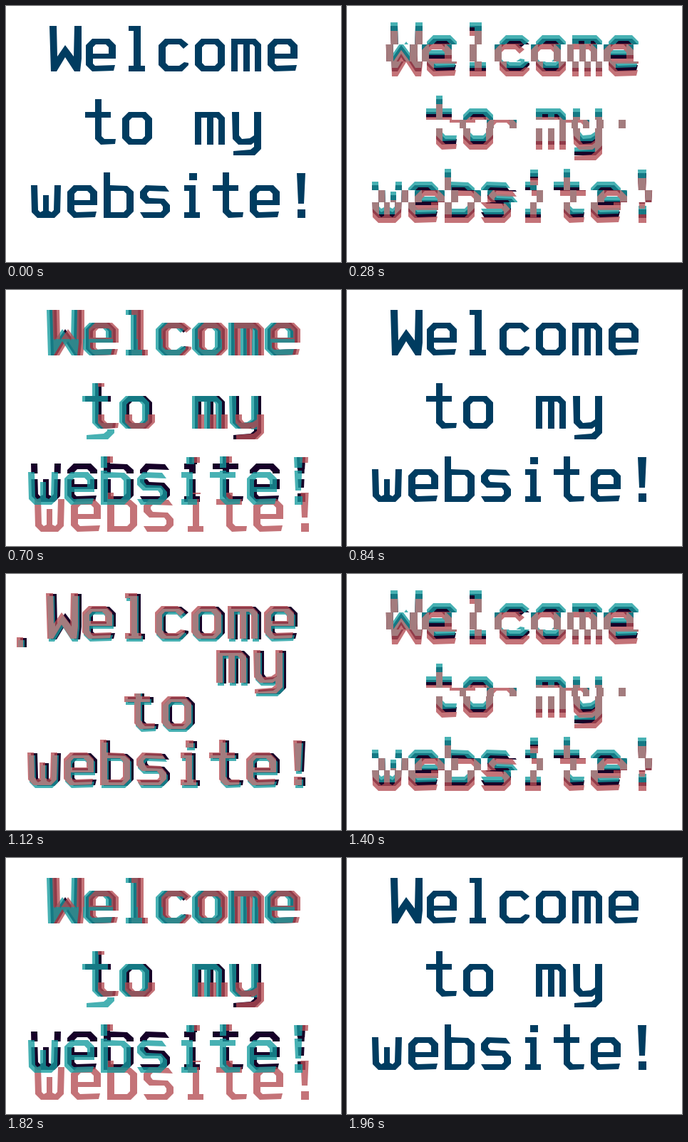
Write an HTML page with a canvas that moves like this. It is 470 px wide and 360 px high and loops after 2.1 s.

```html
<!DOCTYPE html>
<html lang="en">
<head>
<meta charset="utf-8">
<title>Welcome to my website!</title>
<style>
html, body { margin: 0; width: 100%; height: 100%; overflow: hidden; background: #fff; }
canvas { display: block; }
</style>
</head>
<body>
<canvas id="stage" width="470" height="360"></canvas>
<script>
const ctx = document.getElementById('stage').getContext('2d');
const PITCH = 51.1, STEP = 140;
const NAVY = '#003c60', DARK = '#160028', GREY = '#a37c7e';
const CYAN = 'rgba(20,155,158,.78)', RED = 'rgba(180,76,83,.78)';

// Glyph outlines, centred on x = 0 with the baseline at y = 0.
const glyphs = {
  W: 'M-21-64h10l1 43 11-16 12 16 1-43h10v46l-2 18h-8l-13-20-12 20h-8z',
  e: 'M-21-37l9-9h24l9 9v19h-32v7l3 3 28-1-2 8-30 1-9-9zM-11-25h22v-9l-4-4h-14l-4 4z',
  l: 'M-12-64h17v56h6v8h-23v-8h7v-49h-7z',
  c: 'M-21-37l9-9h23l10 8-7 6-6-6h-15l-4 4v22l4 4h15l7-5 6 1v3l-9 9h-24l-9-9z',
  o: 'M-21-37l9-9h24l9 9v28l-9 9h-24l-9-9zM-11-34v22l4 4h14l4-4v-22l-4-4h-14z',
  m: 'M-21-46h34l8 8v38h-9v-35l-3-3h-4v38h-9v-38h-8v38h-9z',
  t: 'M-8-64h9v18h13v8h-13v26l4 4h16l-1 7-20 1-8-8v-30h-14v-8h14z',
  y: 'M-20-46h10v33l4 5 11-1 6-4v-33h10v52l-9 9h-30v-6l24-2 5-4v-6l-4 3h-18l-8-8z',
  w: 'M-21-46h9l1 35 3 3 4-2v-22h8v22l4 2 3-3 1-35h9l-1 38-8 8h-24l-8-8z',
  b: 'M-21-64h9v18l24 1 9 8v28l-9 9h-33zM-11-38v30h18l4-4v-22l-4-4z',
  s: 'M-21-37l8-9 27 1 6 8-28-1-3 3v3l3 4 21 1 8 9v9l-9 9h-28l-5-8h29l3-3v-5l-3-4h-21l-8-8z',
  i: 'M-4-63h11v10h-11zM-11-46h16v38h6v8h-22v-8h7v-30h-7z',
  '!': 'M-6-63h12l-2 43h-8zM-5-12h11v12h-11z'
};

const text = new Path2D();
['Welcome', 'to my', 'website!'].forEach((line, row) => {
  [...line].forEach((ch, i) => {
    if (!glyphs[ch]) return;
    const x = Math.round(235 + (i - (line.length - 1) / 2) * PITCH);
    text.addPath(new Path2D(glyphs[ch]), new DOMMatrix().translate(x, 92 + 103 * row));
  });
});

const layer = (color, x = 0, y = 0) => () => {
  ctx.save();
  ctx.translate(x, y);
  ctx.fillStyle = color;
  ctx.fill(text, 'evenodd');
  ctx.restore();
};

// Fills only where two shifted copies of the text meet.
const overlap = (color, ax, ay, bx, by) => () => {
  ctx.save();
  ctx.translate(ax, ay);
  ctx.clip(text, 'evenodd');
  layer(color, bx - ax, by - ay)();
  ctx.restore();
};

// Each slice: top, bottom, dx, dy, left, right.
function paint(layers, slices = [[0, 360]]) {
  for (const [top, bottom, dx = 0, dy = 0, left = 0, right = 470] of slices) {
    ctx.save();
    ctx.translate(dx, dy);
    ctx.beginPath();
    ctx.rect(left, top, right - left, bottom - top);
    ctx.clip();
    layers.forEach(draw => draw());
    ctx.restore();
  }
}

const split = (cx, cy, rx, ry) => [
  layer(DARK), layer(CYAN, cx, cy), layer(RED, rx, ry), overlap(GREY, cx, cy, rx, ry)
];

const poses = {
  clean: () => paint([layer(NAVY)]),
  sideways: () => paint(split(-9, 0, 17, 0)),
  bands: () => paint(split(0, -5, 0, 7), [
    [0, 54], [54, 78, -7], [78, 160], [160, 172, 33], [172, 259], [259, 276, 9], [276, 360]
  ]),
  torn() {
    paint([layer(DARK)], [[0, 252], [252, 266, 0, -8], [266, 360]]);
    paint([layer(RED)], [[69, 110, 4], [232, 243, 4], [243, 300, 5, 42]]);
    paint([layer(CYAN)], [[0, 196, -4], [196, 220, -206], [220, 250, -4], [250, 300, -4, 4]]);
    paint([layer(RED)], [[0, 69, 4], [130, 136, 4], [175, 215, 4]]);
  },
  scattered: () => paint(split(-3, 3, -5, -1), [
    [0, 110], [225, 360],
    [110, 144, -105, -41, 0, 235],
    [144, 225, 60, 24, 0, 235],
    [110, 225, 35, -41, 235]
  ])
};

const { clean, sideways, bands, torn, scattered } = poses;
const sequence = [
  clean, sideways, bands, clean, clean, torn, clean, clean,
  scattered, clean, bands, clean, bands, torn, clean
];

function frame() {
  ctx.fillStyle = '#fff';
  ctx.fillRect(0, 0, 470, 360);
  sequence[Math.floor(performance.now() / STEP) % sequence.length]();
  requestAnimationFrame(frame);
}
frame();
</script>
</body>
</html>
```
